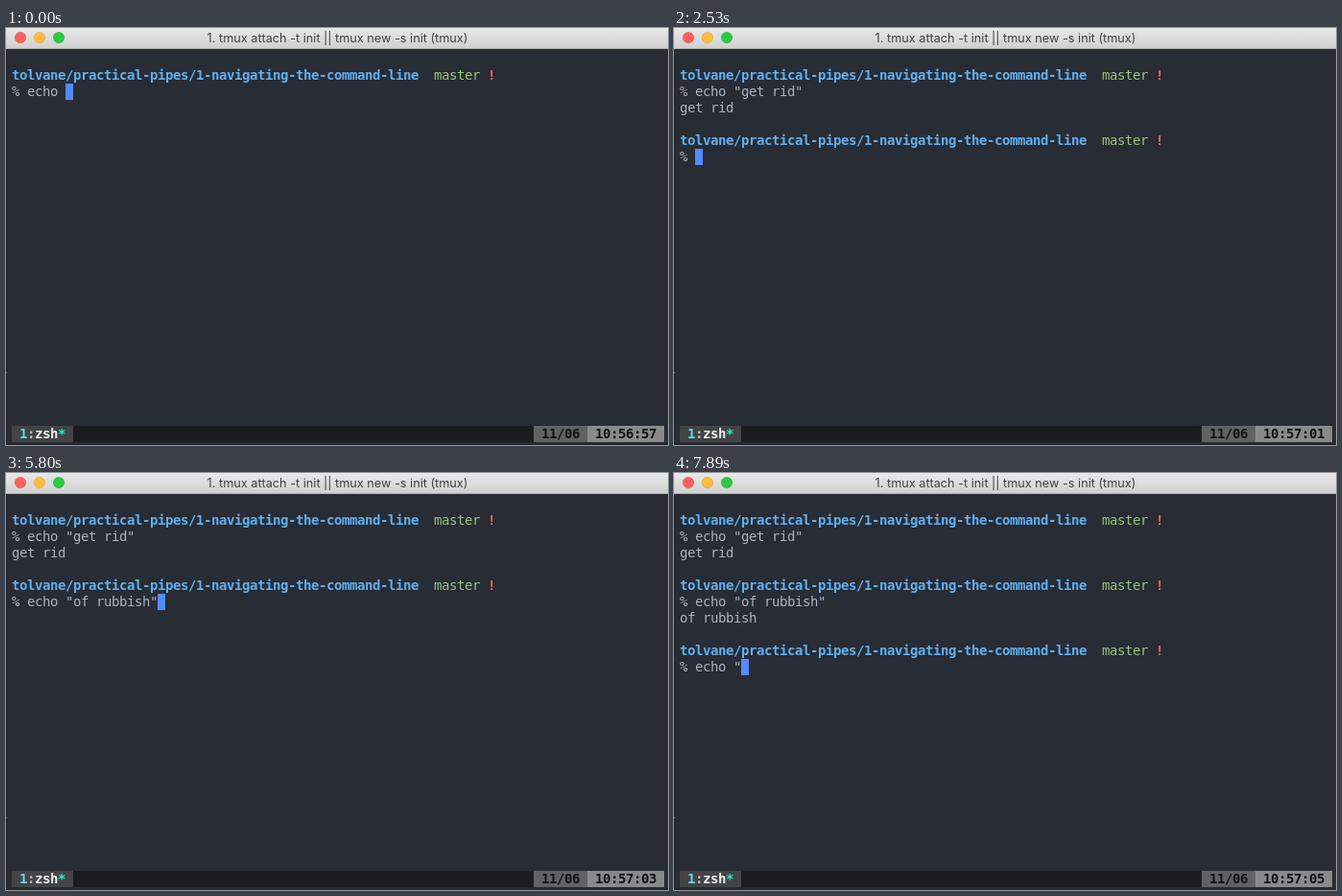
An HTML page with a canvas for the animation above (8000 ms loop, 690x435 px).

```html
<!DOCTYPE html>
<html lang="en">
<head>
<meta charset="utf-8">
<title>Terminal session</title>
<style>
  html, body { margin: 0; width: 100%; height: 100%; overflow: hidden; background: #282c34; }
  canvas { display: block; width: 690px; height: 435px; }
</style>
</head>
<body>
<canvas id="stage" width="690" height="435"></canvas>
<script>
const ctx = document.getElementById('stage').getContext('2d');
const W = 690, H = 435, LOOP = 8000;
const CELL_W = 8, CELL_H = 17, LEFT = 6, TOP = 24;
const MONO = '14px "DejaVu Sans Mono", monospace';
const PATH = 'tolvane/practical-pipes/1-navigating-the-command-line';
const FG = '#abb2bf';

// Each block: when its prompt appears, when enter is pressed, its output,
// and the typed text as [time, text] steps.
const blocks = [
  {
    row: 1, start: 0, enter: 2230, output: 'get rid',
    keys: [[0, 'echo '], [1050, 'echo "'], [1200, 'echo "g'], [1350, 'echo "get'],
      [1490, 'echo "get '], [1640, 'echo "get r'], [1790, 'echo "get rid'],
      [1930, 'echo "get rid"']]
  },
  {
    row: 5, start: 2380, enter: 5940, output: 'of rubbish',
    keys: [[3130, 'e'], [3280, 'ech'], [3420, 'echo '], [3710, 'echo "'],
      [4160, 'echo "of '], [4460, 'echo "of r'], [4610, 'echo "of ru'],
      [4750, 'echo "of rub'], [4900, 'echo "of rubbi'], [5050, 'echo "of rubbish'],
      [5800, 'echo "of rubbish"']]
  },
  {
    row: 9, start: 5940, enter: Infinity, output: '',
    keys: [[6390, 'e'], [6690, 'ech'], [6840, 'echo'], [6990, 'echo '],
      [7140, "echo '"], [7590, 'echo '], [7890, 'echo "']]
  }
];

const clock = [[0, '10:56:57'], [450, '10:56:59'], [2380, '10:57:01'],
  [4460, '10:57:03'], [6390, '10:57:05']];

function latest(steps, t) {
  let value = '';
  for (const [at, v] of steps) if (t >= at) value = v;
  return value;
}

function rect(x, y, w, h, color) {
  ctx.fillStyle = color;
  ctx.fillRect(x, y, w, h);
}

function cells(col, row, count, color) {
  rect(LEFT + col * CELL_W, TOP + row * CELL_H, count * CELL_W, CELL_H, color);
}

// Terminal text sits on a fixed grid, one glyph per cell.
function print(col, row, text, color, bold) {
  ctx.font = (bold ? 'bold ' : '') + MONO;
  ctx.textAlign = 'left';
  ctx.fillStyle = color;
  const y = TOP + row * CELL_H + 13;
  [...text].forEach((ch, i) => ctx.fillText(ch, LEFT + (col + i) * CELL_W, y));
}

function drawTitleBar() {
  const shade = ctx.createLinearGradient(0, 0, 0, 21);
  shade.addColorStop(0, '#e9e8e9');
  shade.addColorStop(1, '#d1d0d1');
  rect(0, 0, W, 21, shade);
  rect(0, 21, W, 1, '#acabac');

  const lights = [['#fc605b', '#e2463f'], ['#fdbc40', '#dfa023'], ['#2aca41', '#1dad2b']];
  lights.forEach(([fill, edge], i) => {
    ctx.beginPath();
    ctx.arc(15 + i * 20, 10, 5.6, 0, Math.PI * 2);
    ctx.fillStyle = fill;
    ctx.fill();
    ctx.strokeStyle = edge;
    ctx.lineWidth = 0.6;
    ctx.stroke();
  });

  ctx.font = '12.7px Inter, sans-serif';
  ctx.textAlign = 'center';
  ctx.fillStyle = '#434243';
  ctx.fillText('1. tmux attach -t init || tmux new -s init (tmux)', 345.5, 15);
}

function drawBlock(block, t) {
  if (t < block.start) return;
  const { row } = block;
  const typed = latest(block.keys, t);
  print(0, row, PATH, '#61afef', true);
  print(55, row, 'master', '#98c379');
  print(62, row, '!', '#f0626c', true);
  print(0, row + 1, '% ' + typed, FG);
  if (t >= block.enter) print(0, row + 2, block.output, FG);
}

function drawCursor(t) {
  const block = blocks.filter(b => t >= b.start).pop();
  const entered = t >= block.enter;
  const col = entered ? 0 : 2 + latest(block.keys, t).length;
  cells(col, block.row + (entered ? 3 : 1), 1, '#528bff');
}

function drawStatus(t) {
  const row = 23;
  cells(0, row, 85, '#1c1c1c');
  cells(0, row, 8, '#444444');
  print(1, row, '1', '#5fd7f5', true);
  print(2, row, ':', '#bcbcbc', true);
  print(3, row, 'zsh', '#eeeeee', true);
  print(6, row, '*', '#1ff0cd', true);
  cells(68, row, 7, '#626262');
  print(69, row, '11/06', '#121212', true);
  cells(75, row, 10, '#8a8a8a');
  print(76, row, latest(clock, t), '#121212', true);
}

function draw(t) {
  rect(0, 0, W, H, '#282c34');
  rect(0, 22, 1, H - 22, '#1c1f26');
  rect(0, H - 1, W, 1, '#1c1f26');
  rect(0, 359, 1, 1, '#6a6d73');
  drawTitleBar();
  blocks.forEach(b => drawBlock(b, t));
  drawCursor(t);
  drawStatus(t);
}

const begin = performance.now();
function tick() {
  draw((performance.now() - begin) % LOOP);
  requestAnimationFrame(tick);
}
tick();
</script>
</body>
</html>
```
